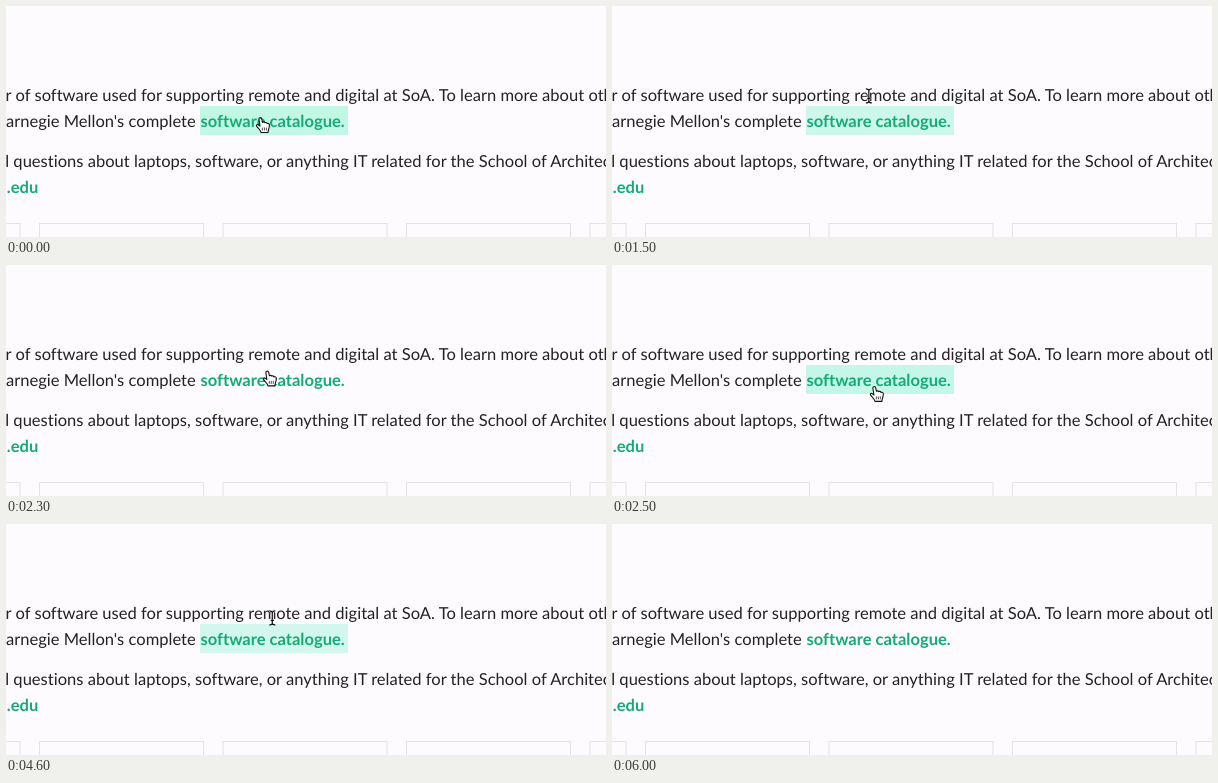
Animation of 600x231 px, one loop 6.1 s. Source, as an HTML page with a canvas:

```html
<!DOCTYPE html>
<html lang="en">
<head>
<meta charset="utf-8">
<title>Link hover</title>
<style>
html, body { margin: 0; width: 100%; height: 100%; overflow: hidden; background: #fdfbfd; }
canvas { display: block; width: 600px; height: 231px; }
</style>
</head>
<body>
<canvas id="stage" width="600" height="231"></canvas>
<script>
const ctx = document.getElementById('stage').getContext('2d');
const LOOP = 6100, STEP = 100, FADE = 240, GONE = 5400;
const REGULAR = '16.55px Lato, sans-serif';
const BOLD = 'bold 16.55px Lato, sans-serif';
const PAPER = '#fdfbfd', INK = '#222125', GREEN = '#14ab74';

const START = { x: 254.5, y: 111.5 };
const MOVES = [
  { at: 1300, dur: 650, x: 259, y: 70 },
  { at: 2090, dur: 480, x: 262.5, y: 122.5 },
  { at: 4440, dur: 480, x: 269.3, y: 71 },
  { at: 5200, dur: 100, x: 270, y: 50 }
];

const ARROW = new Path2D('M0 0V12.2L2.8 9.6L4.6 13.8L6.6 12.9L4.8 8.8H8.6Z');
const HAND = new Path2D('M-1.6 1.4Q-1.3 .1 -.1 .1Q1 .2 1.3 1.6L2 4.9Q3.4 3.8 4.5 5.2' +
  'Q5.8 4.5 6.7 6Q8.6 5.3 8.9 7.4C9.2 10 7.6 12 7.5 15H.6C0 12.5 -2 11 -3.8 8.8' +
  'Q-4.6 7 -2.7 7L-.5 8.6Z');
const FINGERS = new Path2D('M1.9 10V13M3.9 10V13M5.9 10V13');
const IBEAM = new Path2D('M-3 -7Q0 -7 0 -5Q0 -7 3 -7M0 -5V5M-3 7Q0 7 0 5Q0 7 3 7M-1.6 2.5H1.6');

const clamp = p => Math.min(1, Math.max(0, p));
const easeOut = p => 1 - (1 - clamp(p)) ** 2;

function fade(t, at) {
  const p = clamp((t - at) / FADE);
  return p * p * (3 - 2 * p);
}

// The pointer leaves the link, enters it and leaves again
const hover = t => 1 - fade(t, 1430) + fade(t, 2290) - fade(t, 4510);

function pointerAt(t) {
  let { x, y } = START;
  for (const m of MOVES) {
    const p = easeOut((t - m.at) / m.dur);
    x += (m.x - x) * p;
    y += (m.y - y) * p;
  }
  return [x, y];
}

function write(text, x, y, font, color, align = 'left') {
  ctx.font = font;
  ctx.textRendering = 'geometricPrecision';
  ctx.letterSpacing = '0.01px'; // any spacing turns ligatures off
  ctx.fillStyle = color;
  ctx.textAlign = align;
  ctx.fillText(text, x, y);
}

// A line set outwards from x in both directions
function line(before, after, x, y) {
  write(before, x, y, REGULAR, INK, 'right');
  write(after, x, y, REGULAR, INK);
}

function outline(path, color, width) {
  ctx.strokeStyle = color;
  ctx.lineWidth = width;
  ctx.stroke(path);
}

function drawPointer(x, y) {
  ctx.save();
  ctx.translate(x, y);
  ctx.lineJoin = 'round';
  if (y < 77) {
    outline(ARROW, '#fff', 2);
    ctx.fillStyle = '#000';
    ctx.fill(ARROW);
  } else if (y < 101) {
    outline(IBEAM, '#fff', 2.4);
    outline(IBEAM, '#111', 1.2);
  } else {
    ctx.fillStyle = '#fff';
    ctx.fill(HAND);
    outline(HAND, '#111', 1.1);
    outline(FINGERS, '#222', 0.8);
  }
  ctx.restore();
}

function draw(t) {
  ctx.fillStyle = PAPER;
  ctx.fillRect(0, 0, 600, 231);

  ctx.globalAlpha = clamp(hover(t));
  ctx.fillStyle = '#c2f7e6';
  ctx.fillRect(194, 100, 148, 29);
  ctx.globalAlpha = 1;

  line('er of software used for supporting ',
    'remote and digital at SoA. To learn more about other', 242.2, 95);
  line("Carnegie Mellon's ", 'complete', 122.5, 121);
  line('al questions about laptops, software, or ',
    'anything IT related for the School of Architecture', 280, 161);
  write('software catalogue.', 194.5, 121, BOLD, GREEN);
  write('.edu', 0.8, 187, BOLD, GREEN);

  ctx.strokeStyle = '#e4e2e6';
  ctx.lineWidth = 1;
  for (let i = -1; i < 4; i++) ctx.strokeRect(33.5 + i * 183.5, 217.5, 164, 40);

  if (t < GONE) drawPointer(...pointerAt(t));
}

function tick(now) {
  draw(Math.floor(now % LOOP / STEP) * STEP);
  requestAnimationFrame(tick);
}
tick(performance.now());
</script>
</body>
</html>
```
